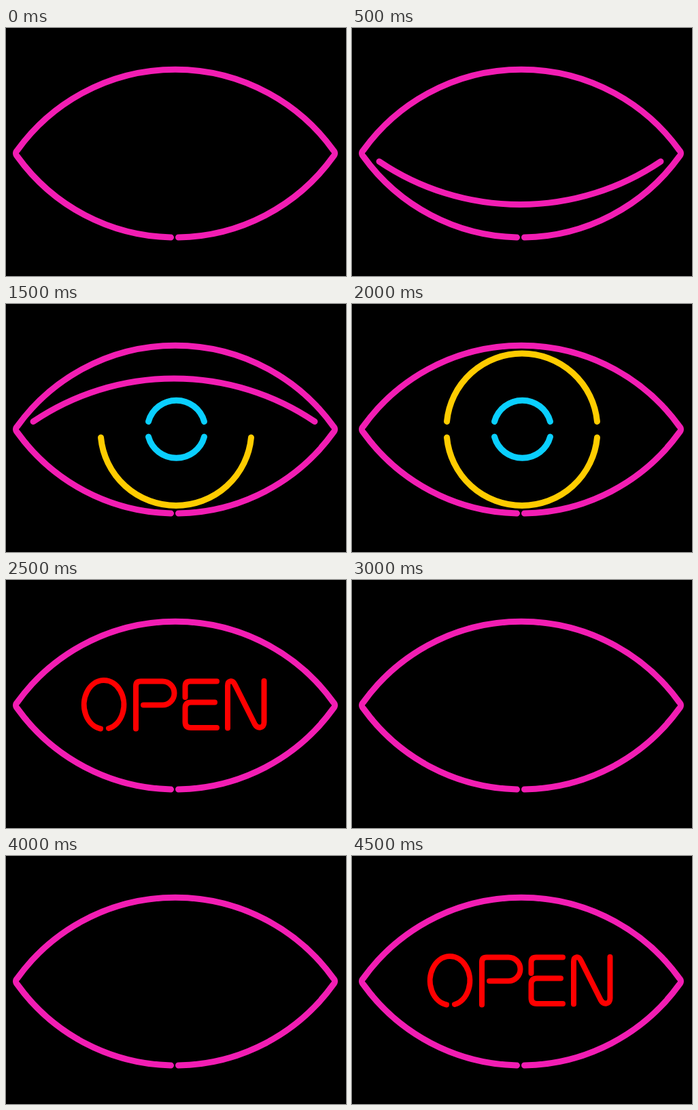
An HTML page for the animation above (5000 ms loop, 500 by 366 pixels).

```html
<!DOCTYPE html>
<html lang="en">
<head>
<meta charset="utf-8">
<title>Neon eye</title>
<style>
  html, body { margin: 0; width: 100%; height: 100%; overflow: hidden; background: #000; }
  svg { display: block; width: 500px; height: 366px; }
  path { fill: none; stroke-width: 9; stroke-linecap: round; stroke-linejoin: round; visibility: hidden; }
  .pink { stroke: #f21db3; }
  .yellow { stroke: #ffcc00; }
  .cyan { stroke: #0acfff; }
  .red { stroke: #ff0000; stroke-width: 8; }
</style>
</head>
<body>
<svg viewBox="0 0 500 366">
  <path id="outline" class="pink" d="M242.500 309A286 286 0 0 1 17 190Q12 185 17 180A286 286 0 0 1 481 180Q486 185 481 190A286 286 0 0 1 253.500 309"/>
  <path id="lidLow" class="pink" d="M40 197A369 369 0 0 0 454 197"/>
  <path id="lidMid" class="pink" d="M39.500 184.500H454.500"/>
  <path id="lidHigh" class="pink" d="M40 173.500A369 369 0 0 1 454 173.500"/>
  <path id="irisTop" class="yellow" d="M139.500 173.500A111 111 0 0 1 360.500 173.500"/>
  <path id="irisBottom" class="yellow" d="M139.500 197A111 111 0 0 0 360.500 197"/>
  <path id="pupilTop" class="cyan" d="M209.500 173.500A42.500 42.500 0 0 1 291.500 173.500"/>
  <path id="pupilBottom" class="cyan" d="M209.500 196A42.500 42.500 0 0 0 291.500 196"/>
  <path id="open" class="red" d="
    M139 219.500A29.300 36 0 1 1 151 219
    M191 219.500V156.500Q191 149.500 198 149.500H230A17.500 17.500 0 0 1 230 184.500H202
    M263.500 173V157Q263.500 149.500 271 149.500H310
    M307 180.500H272Q263.500 180.500 263.500 189V209.500Q263.500 218 272 218H310
    M326 218.500V156C326 148 333 147 336.500 154L366 213C370 220 379.500 219 379.500 210V149"/>
</svg>
<script>
  const STEP = 500;
  // Tubes lit in each step, besides the outline that is always on.
  const steps = [
    '',
    'lidLow',
    'lidMid irisBottom pupilBottom',
    'lidHigh irisBottom pupilBottom pupilTop',
    'irisTop irisBottom pupilTop pupilBottom',
    'open', '', 'open', '', 'open'
  ].map(ids => new Set(['outline', ...ids.split(' ')]));
  const tubes = document.querySelectorAll('path');

  function draw() {
    const lit = steps[Math.floor(performance.now() / STEP) % steps.length];
    for (const tube of tubes) tube.style.visibility = lit.has(tube.id) ? 'visible' : 'hidden';
    requestAnimationFrame(draw);
  }
  draw();
</script>
</body>
</html>
```
